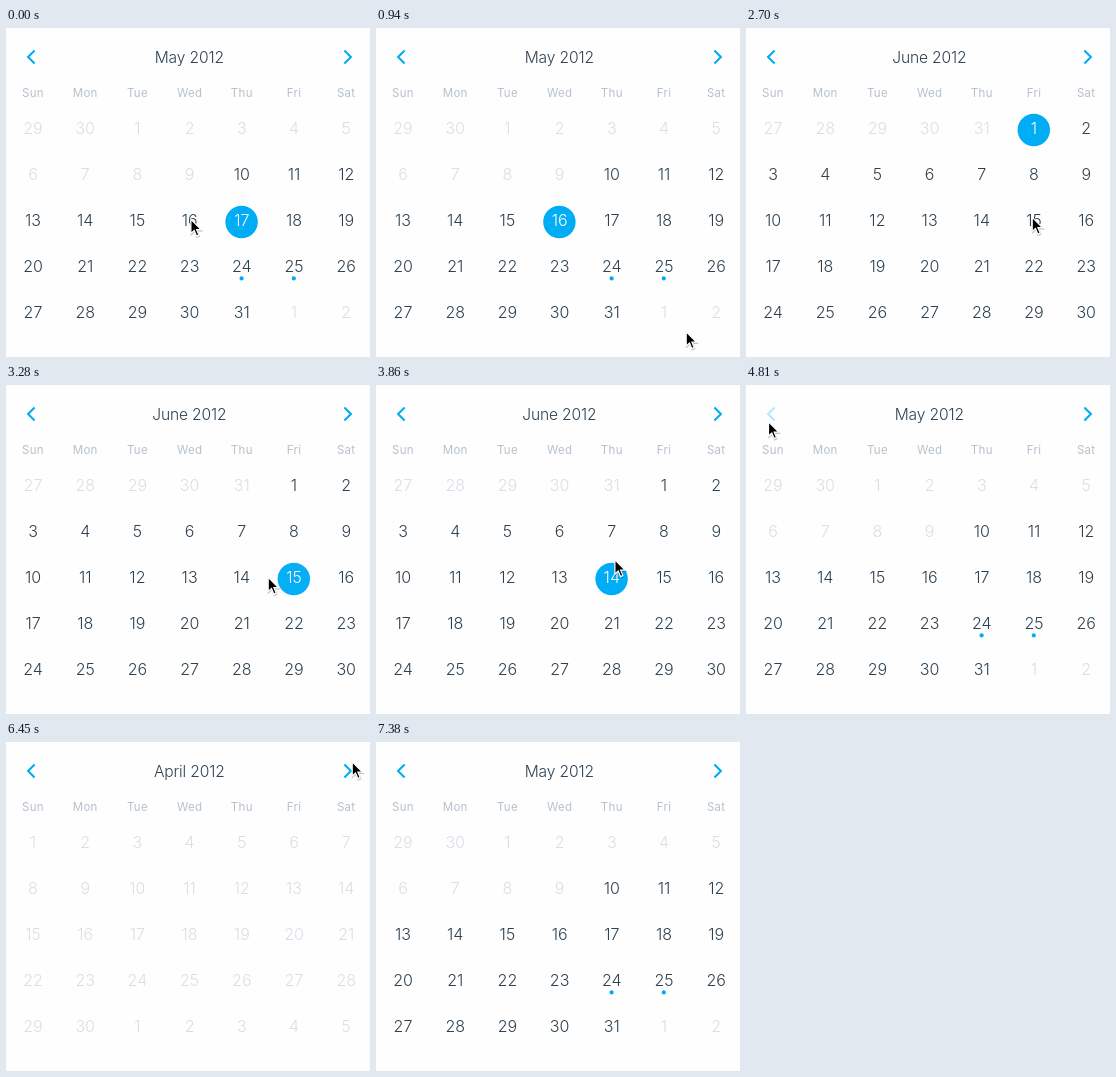
These frames come from a looping animation (364x329 px, 8000 ms). An HTML page:

```html
<!DOCTYPE html>
<html lang="en">
<head>
<meta charset="utf-8">
<title>Calendar</title>
<style>
  html, body { margin: 0; width: 100%; height: 100%; overflow: hidden; background: #fefefe; }
  svg { display: block; width: 364px; height: 329px; font-family: Inter, Roboto, sans-serif; }
  text { text-anchor: middle; }
  .title, .day { font-size: 16px; font-weight: 300; fill: #2d4150; }
  .title { font-size: 15.6px; letter-spacing: -0.15px; }
  .day.off { fill: #d9dfe5; }
  .day.on { fill: #fff; }
  .week { font-size: 11.5px; letter-spacing: 0.3px; fill: #b6c1cd; }
  .arrow { fill: none; stroke: #00adf5; stroke-width: 2.1; }
  .accent { fill: #00adf5; }
</style>
</head>
<body>
<svg viewBox="0 0 364 329"></svg>
<script>
const LOOP = 8000, TICK = 117.2; // the picture advances once per tick
const PRESS = 1.5, FADE_OUT = 1.28, FADE_IN = 2.13; // in ticks
const MONTHS = ['January', 'February', 'March', 'April', 'May', 'June'];
const WEEK = ['Sun', 'Mon', 'Tue', 'Wed', 'Thu', 'Fri', 'Sat'];
const date = (month, day) => new Date(2012, MONTHS.indexOf(month), day);
const FIRST_ENABLED = date('May', 10);
const MARKED = [date('May', 24), date('May', 25)].map(Number);

const svg = document.querySelector('svg');
const columnX = i => 27 + i * 52.2;
const rowY = i => 100 + i * 46;

function add(parent, tag, attrs, label) {
  const el = document.createElementNS('http://www.w3.org/2000/svg', tag);
  for (const key in attrs) el.setAttribute(key, attrs[key]);
  if (label) el.textContent = label;
  return parent.appendChild(el);
}

const show = (el, visible) => { el.style.display = visible ? '' : 'none'; };

const title = add(svg, 'text', { class: 'title', x: 183.3, y: 34.7 });
const prev = add(svg, 'path', { class: 'arrow', d: 'M28.6 22.5L22.1 29l6.5 6.5' });
const next = add(svg, 'path', { class: 'arrow', d: 'M338.4 22.5l6.5 6.5-6.5 6.5' });
WEEK.forEach((name, i) => add(svg, 'text', { class: 'week', x: columnX(i), y: 69 }, name));

const cells = Array.from({ length: 35 }, (_, i) => {
  const x = columnX(i % 7), y = rowY(Math.floor(i / 7));
  const group = add(svg, 'g', {});
  return {
    group,
    disc: add(group, 'circle', { class: 'accent', cx: x - 0.2, cy: y + 2, r: 16.2 }),
    label: add(group, 'text', { class: 'day', x, y: y + 5.7 }),
    dot: add(group, 'circle', { class: 'accent', cx: x - 0.2, cy: y + 12.4, r: 2.1 })
  };
});

const pointer = 'M0.2 0.4V14.4L3.5 11.5 5.8 17.1 8.2 16.1 5.9 10.7H10.4Z';
const cursor = add(svg, 'g', {});
add(cursor, 'path', { d: pointer, transform: 'translate(0.4 1)', opacity: 0.22, stroke: '#000', 'stroke-width': 1.6 });
add(cursor, 'path', { d: pointer, stroke: '#fff', 'stroke-width': 1.2 });

const slot = (row, weekday) => cells[row * 7 + WEEK.indexOf(weekday)].group;
const pick = (at, target, month, day) => ({ at, target, month, picked: date(month, day) });
const turn = (at, target, month) => ({ at, target, month });

const presses = [
  pick(0.8, slot(2, 'Wed'), 'May', 16),
  pick(12.6, slot(4, 'Fri'), 'June', 1),
  pick(24.6, slot(2, 'Fri'), 'June', 15),
  pick(28.8, slot(2, 'Thu'), 'June', 14),
  turn(39.1, prev, 'May'),
  turn(43.3, prev, 'April'),
  turn(56.6, next, 'May')
];

// Pointer stops; it glides between them and is gone after the last.
const stop = (x, y, arrive, leave = arrive) => ({ x, y, arrive, leave });
const stops = [
  stop(184.7, 191, 0, 5),
  stop(184, 211, 7),
  stop(310, 303.5, 8),
  stop(287, 280, 11, 17),
  stop(286, 189, 23, 27),
  stop(238, 195, 29, 32),
  stop(238.7, 174.5, 33),
  stop(22.3, 36.5, 39, 46),
  stop(150, 199, 47),
  stop(319.5, 71.5, 48),
  stop(258, 106, 52),
  stop(346, 19.5, 55, 63)
];

const clamp = v => Math.max(0, Math.min(1, v));
const ease = v => v * v * (3 - 2 * v);
const progress = (t, from, length) => ease(clamp((t - from) / length));

function pressOpacity(at, t) {
  return 1 - 0.8 * progress(t, at, FADE_OUT) * (1 - progress(t, at + PRESS, FADE_IN));
}

function drawMonth(month, picked) {
  title.textContent = month + ' 2012';
  const first = date(month, 1);
  cells.forEach(({ label, disc, dot }, i) => {
    const day = date(month, 1 - first.getDay() + i);
    const inMonth = day.getMonth() === first.getMonth();
    const selected = inMonth && +day === +picked;
    const enabled = inMonth && day >= FIRST_ENABLED;
    label.textContent = day.getDate();
    label.setAttribute('class', 'day ' + (selected ? 'on' : enabled ? '' : 'off'));
    show(disc, selected);
    show(dot, inMonth && MARKED.includes(+day));
  });
}

function drawCursor(t) {
  const i = stops.findIndex(s => t < s.leave);
  show(cursor, i >= 0);
  if (i < 0) return;
  const to = stops[i], from = stops[i - 1] || to;
  const k = progress(t, from.leave, to.arrive - from.leave || 1);
  const mix = axis => from[axis] + (to[axis] - from[axis]) * k;
  cursor.setAttribute('transform', `translate(${mix('x')} ${mix('y')})`);
}

function render(ms) {
  const t = Math.floor((ms + 12) / TICK);
  let month = 'May', picked = date('May', 17);
  for (const press of presses) press.target.style.opacity = 1;
  for (const press of presses) {
    if (t < press.at) break;
    press.target.style.opacity = pressOpacity(press.at, t);
    if (t < press.at + PRESS) break;
    month = press.month;
    picked = press.picked || picked;
  }
  drawMonth(month, picked);
  drawCursor(t);
}

const start = performance.now();
function loop() {
  render((performance.now() - start) % LOOP);
  requestAnimationFrame(loop);
}
loop();
</script>
</body>
</html>
```
